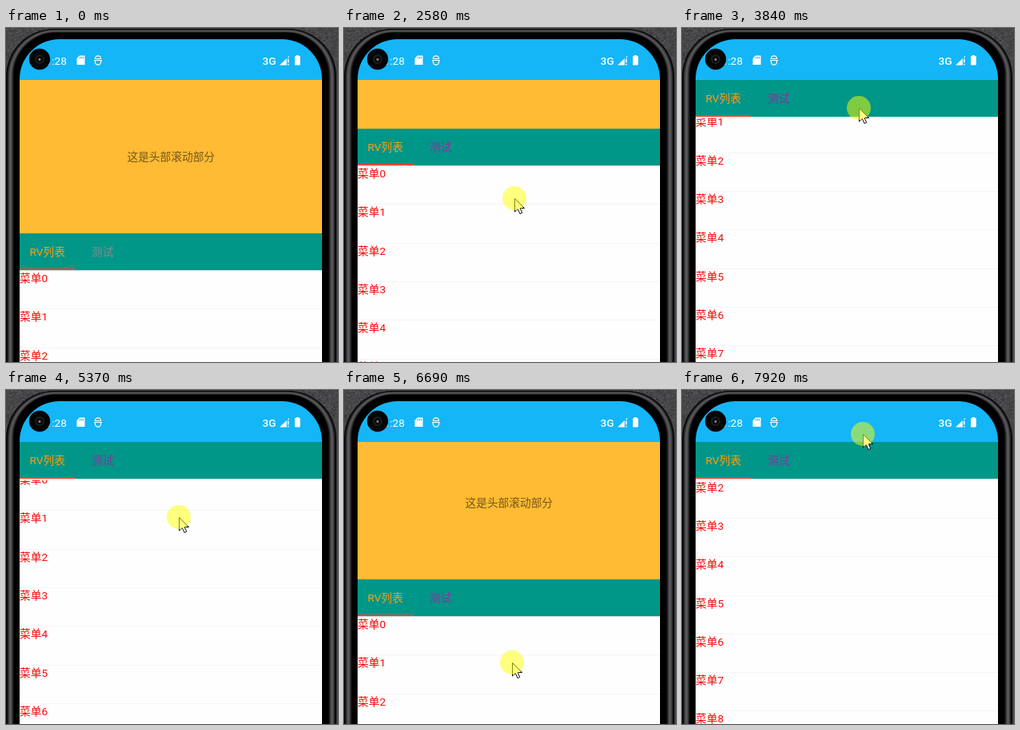
Write an HTML page with a canvas that moves like this. It is 415 px wide and 418 px high and loops after 7.99 s.

```html
<!DOCTYPE html>
<html lang="zh">
<head>
<meta charset="utf-8">
<title>Nested scroll</title>
<style>
  html, body { margin: 0; width: 100%; height: 100%; overflow: hidden; background: #000; }
  canvas { display: block; width: 415px; height: 418px; }
</style>
</head>
<body>
<canvas id="stage"></canvas>
<script>
const W = 415, H = 418, LOOP = 7990;
const LEFT = 17, WIDE = 378, TOP = 14, BAR = 65, HEADER = 192, TABS = 46, ROW = 48.3;
const FONT = 'Roboto, "Noto Sans CJK SC", "Noto Sans CJK", sans-serif';
const ENTER = 130, MOVED = 900;

// The screen refreshes at a fixed rate
const STEP = 69.3, PHASE = 15.4;

// Pointer height over time: enter, drag up, drag down, drag up again
const KEYS = [
  [ENTER, 424], [720, 374], [880, 374], [1540, 311], [2580, 213], [3840, 99], [4540, 45],
  [4730, 45], [5352, 159.5], [6668, 340.5], [7170, 359], [7250, 359], [7911, 55]
];

const dpr = window.devicePixelRatio || 1;
const canvas = document.getElementById('stage');
let ctx = setUp(canvas);

function setUp(target) {
  target.width = W * dpr;
  target.height = H * dpr;
  const context = target.getContext('2d');
  context.scale(dpr, dpr);
  return context;
}

function snap(t) {
  return Math.max(0, Math.floor((t - PHASE) / STEP + 1e-6) * STEP + PHASE);
}

function heightAt(t) {
  const i = KEYS.findIndex(([time]) => t <= time);
  if (i < 0) return KEYS[KEYS.length - 1][1];
  if (i === 0) return KEYS[0][1];
  const [t0, y0] = KEYS[i - 1], [t1, y1] = KEYS[i];
  return y0 + (y1 - y0) * (t - t0) / (t1 - t0);
}

// The hand swings right towards both ends of its path
function swing(y) {
  const reach = y > 344 ? 30 : 300;
  return 210 + 17 * Math.pow(Math.abs(y - 344) / reach, 2.1);
}

// Each drag takes hold after a small touch slop
function scrollAt(t, y) {
  if (t < 4600) return Math.max(0, 344 - y);
  if (t < 7200) return Math.min(299, 360.5 - y);
  return Math.max(1, 343 - y);
}

function rect(x, y, w, h, color) {
  ctx.fillStyle = color;
  ctx.fillRect(x, y, w, h);
}

function roundBox(x, y, w, h, r, color) {
  ctx.beginPath();
  ctx.roundRect(x, y, w, h, r);
  if (!color) return;
  ctx.fillStyle = color;
  ctx.fill();
}

function disc(x, y, r, color) {
  ctx.fillStyle = color;
  ctx.beginPath();
  ctx.arc(x, y, r, 0, Math.PI * 2);
  ctx.fill();
}

function poly(points, color) {
  ctx.beginPath();
  points.forEach(([x, y]) => ctx.lineTo(x, y));
  ctx.closePath();
  ctx.fillStyle = color;
  ctx.fill();
}

function label(text, x, y, color, weight = 400) {
  ctx.font = `${weight} 13.7px ${FONT}`;
  ctx.fillStyle = color;
  ctx.fillText(text, x, y + 4.9);
}

function gray(v) {
  return `rgb(${v},${v},${v + 2})`;
}

function drawPhone() {
  let seed = 7;
  const random = () => (seed = seed * 16807 % 2147483647) / 2147483647;
  rect(0, 0, W, H, gray(70));
  for (let i = 0; i < 1500; i++) {
    const x = random() * 50, y = random() * 50;
    rect(i % 2 ? x : W - x, y, 1.5, 1, gray(40 + random() * 65));
  }
  // Rounded metal rim, shaded in thin shells
  for (let i = 0; i <= 10; i++) {
    const shade = 6 + 84 * Math.pow(Math.sin(Math.PI * i / 10), 2);
    roundBox(i, 1 + i * 0.5, 413 - 2 * i, 520, 60 - i * 0.7, gray(Math.round(shade)));
  }
  roundBox(10, 6, 393, 520, 53, '#000');
}

function drawList(top, offset) {
  rect(LEFT, top, WIDE, H - top, '#fefefe');
  for (let i = 0; i < 12; i++) {
    const y = Math.round(top + i * ROW - offset);
    if (i) rect(LEFT, y, WIDE, 1, '#f4f4f4');
    label('菜单' + i, LEFT, y + 10, '#f80808');
  }
}

function drawTabs(top, moved) {
  const bottom = top + TABS;
  rect(LEFT, bottom, WIDE, 1, '#d9e3e2');
  rect(LEFT, bottom + 1, WIDE, 1, '#f1f4f4');
  rect(LEFT, top, WIDE, TABS, '#009688');
  label('RV列表', 29.5, top + 23.5, '#ff9c10');
  label('测试', 107, top + 23.5, moved ? '#8a35a0' : '#8b8d8a');
  rect(LEFT, bottom - 2, 69, 2, '#f44336');
}

function drawStatus() {
  const white = '#fff', blue = '#14b6f7';
  rect(LEFT, TOP, WIDE, BAR - TOP, blue);
  label('1:28', 49.5, 41, white);

  // Memory card
  poly([[92, 34.5], [98.5, 34.5], [98.5, 46], [88.5, 46], [88.5, 38]], white);
  for (let i = 0; i < 3; i++) rect(92 + i * 2, 36, 1, 2.4, blue);

  // Debugging bug: dome, bar and bowl
  ctx.strokeStyle = white;
  ctx.lineWidth = 1.2;
  ctx.beginPath();
  ctx.arc(115, 38.5, 3.6, Math.PI, 0);
  ctx.closePath();
  ctx.moveTo(111.4, 41);
  ctx.arc(115, 42.5, 3.6, Math.PI, 0, true);
  ctx.lineTo(118.6, 41);
  ctx.stroke();
  rect(110, 40, 10, 1, white);

  label('3G', 320.5, 41, white, 500);
  poly([[342, 46.5], [354, 35], [354, 46.5]], white);
  rect(350.8, 37, 3.4, 10, blue);
  rect(352, 38.5, 1.5, 5, white);
  rect(352, 45, 1.5, 1.5, white);
  rect(362.7, 34, 3.2, 2, white);
  roundBox(361, 35, 6.7, 11.5, 1, white);
}

function drawCamera() {
  disc(42, 39, 13.2, '#050505');
  disc(42, 39, 6, '#1d1d1e');
  disc(42, 39, 4, '#0b0b0c');
  disc(42, 39.5, 1.4, '#8a8a8a');
}

function drawPointer(x, y) {
  const arrow = [[0, 0], [0, 16.5], [3.8, 13], [6.5, 19], [9.2, 17.8], [6.6, 12], [12, 12]];
  poly(arrow.map(([dx, dy]) => [x + dx + 0.5, y + dy + 0.5]), '#fff');
  ctx.strokeStyle = '#111';
  ctx.lineWidth = 1;
  ctx.stroke();
  disc(x, y, 15, 'rgba(255,255,0,.5)');
}

function draw(time) {
  const t = snap(time), y = heightAt(t);
  const scroll = t < ENTER ? 0 : Math.round(scrollAt(t, y));
  const folded = Math.min(HEADER, scroll);
  const tabTop = BAR + HEADER - folded;

  ctx.drawImage(phone, 0, 0, W, H);
  ctx.save();
  roundBox(LEFT, TOP, WIDE, 500, 50);
  ctx.clip();
  drawList(tabTop + TABS, scroll - folded);
  rect(LEFT, BAR, WIDE, tabTop - BAR, '#ffbb33');
  label('这是头部滚动部分', 151.5, 161 - folded, 'rgba(0,0,0,.54)');
  drawTabs(tabTop, t > MOVED);
  drawStatus();
  ctx.restore();
  drawCamera();
  if (t >= ENTER) drawPointer(Math.round(swing(y)), Math.round(y));
}

// The phone body never changes, so paint it once
const phone = document.createElement('canvas');
const screen2d = ctx;
ctx = setUp(phone);
drawPhone();
ctx = screen2d;

const began = performance.now();
function tick() {
  draw((performance.now() - began) % LOOP);
  requestAnimationFrame(tick);
}
tick();
</script>
</body>
</html>
```
